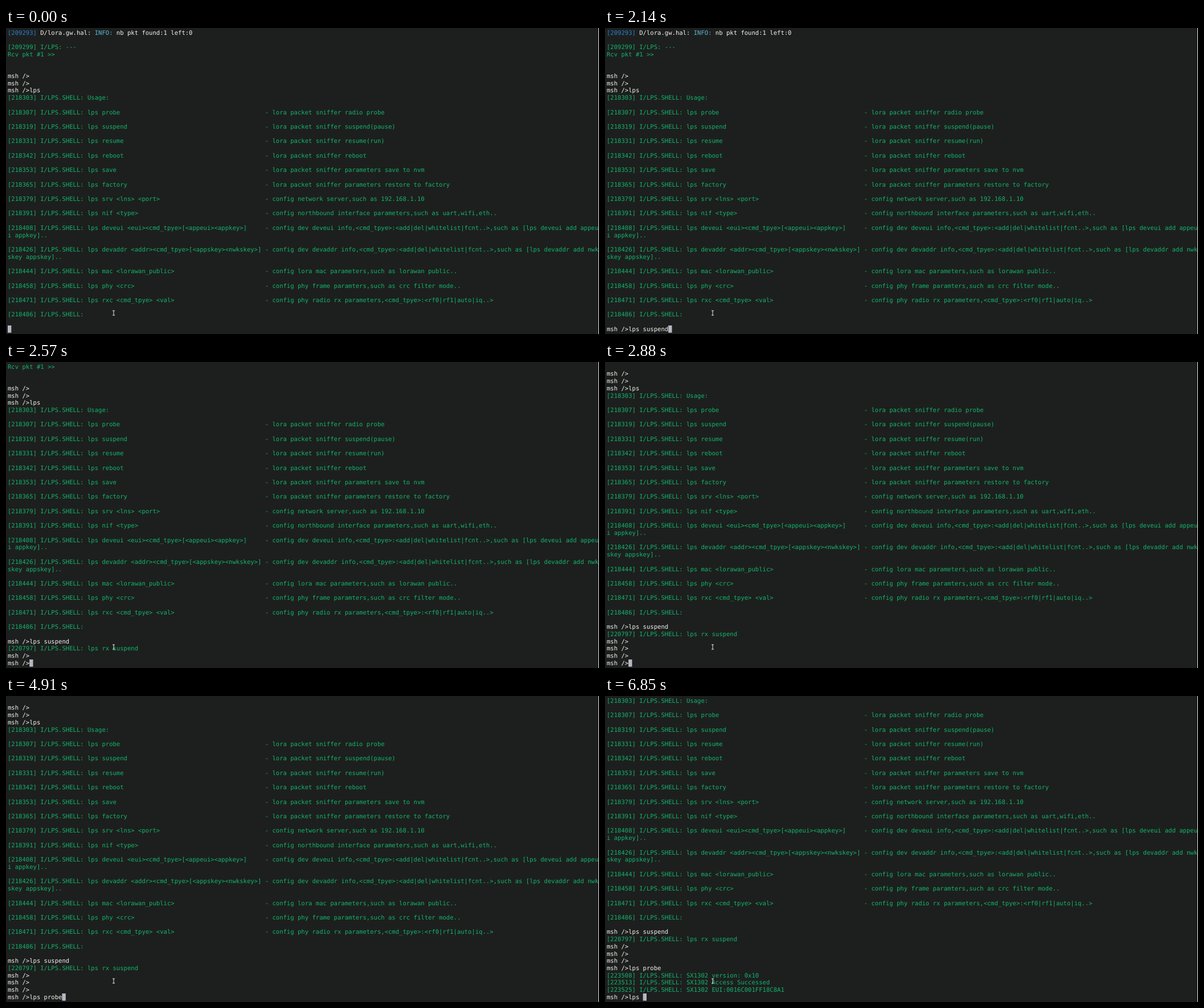
These frames come from a looping animation (1041x538 px, 8000 ms). An HTML page with a canvas:

```html
<!DOCTYPE html>
<html>
<head>
<meta charset="utf-8">
<title>Packet sniffer shell</title>
<style>
html, body { margin: 0; width: 100%; height: 100%; overflow: hidden; background: #1d1f1e; }
canvas { display: block; }
</style>
</head>
<body>
<canvas id="screen" width="1041" height="538"></canvas>
<script>
const ctx = document.getElementById('screen').getContext('2d');
const LOOP = 8000, ROWS = 42, COLS = 163;
const CELL_W = 6.362, CELL_H = 12.71, LEFT = 3, TOP = 1.9;
const BACK = '#1d1f1e', GREEN = '#12b56e', WHITE = '#f4f4f0', BLUE = '#2a83cc', CYAN = '#58bcd8';
const PROMPT = 'msh />';

// A line is a list of [colour, text] runs.
const green = text => [[GREEN, text]];
const white = text => [[WHITE, text]];
const shell = (stamp, text) => green(`[${stamp}] I/LPS.SHELL: ${text}`);

const usage = [
  [218307, 'probe', 'lora packet sniffer radio probe'],
  [218319, 'suspend', 'lora packet sniffer suspend(pause)'],
  [218331, 'resume', 'lora packet sniffer resume(run)'],
  [218342, 'reboot', 'lora packet sniffer reboot'],
  [218353, 'save', 'lora packet sniffer parameters save to nvm'],
  [218365, 'factory', 'lora packet sniffer parameters restore to factory'],
  [218379, 'srv <lns> <port>', 'config network server,such as 192.168.1.10'],
  [218391, 'nif <type>', 'config northbound interface parameters,such as uart,wifi,eth..'],
  [218408, 'deveui <eui><cmd_tpye>[<appeui><appkey>]',
    'config dev deveui info,<cmd_tpye>:<add|del|whitelist|fcnt..>,such as [lps deveui add appeui appkey]..'],
  [218426, 'devaddr <addr><cmd_tpye>[<appskey><nwkskey>]',
    'config dev devaddr info,<cmd_tpye>:<add|del|whitelist|fcnt..>,such as [lps devaddr add nwkskey appskey]..'],
  [218444, 'mac <lorawan_public>', 'config lora mac parameters,such as lorawan public..'],
  [218458, 'phy <crc>', 'config phy frame paramters,such as crc filter mode..'],
  [218471, 'rxc <cmd_tpye> <val>', 'config phy radio rx parameters,<cmd_tpye>:<rf0|rf1|auto|iq..>'],
];

const helpLines = usage.flatMap(([stamp, command, about]) => {
  const text = shell(stamp, ('lps ' + command).padEnd(49) + '- ' + about)[0][1];
  const wrapped = [green(text.slice(0, COLS))];
  if (text.length > COLS) wrapped.push(green(text.slice(COLS)));
  return [...wrapped, []];
});

const history = [
  [[BLUE, '[209293]'], [WHITE, ' D/lora.gw.hal: '], [CYAN, 'INFO:'], [WHITE, ' nb pkt found:1 left:0']],
  [], green('[209299] I/LPS: ---'), green('Rcv pkt #1 >>'), [], [],
  white(PROMPT), white(PROMPT), white(PROMPT + 'lps'),
  shell(218303, 'Usage:'), [],
  ...helpLines,
  shell(218486, ''), [],
];

// Each step: time, then the current input line, and lines printed above it.
const steps = [{ at: 0, input: '', lines: history }];
const print = (at, ...added) =>
  steps.push({ at, input: PROMPT, lines: [...steps.at(-1).lines, ...added] });
const type = (command, keys) => keys.forEach(([at, count]) =>
  steps.push({ at, input: PROMPT + command.slice(0, count), lines: steps.at(-1).lines }));

print(150);
type('lps suspend', [[710, 1], [860, 3], [1140, 4], [1260, 5], [1410, 6], [1560, 7], [1840, 9], [2140, 11]]);
print(2420, white(PROMPT + 'lps suspend'), shell(220797, 'lps rx suspend'));
print(2570, white(PROMPT));
print(2880, white(PROMPT), white(PROMPT));
type('lps probe', [[3460, 1], [3620, 2], [3770, 3], [3920, 4], [4200, 5], [4330, 6], [4480, 7], [4630, 8], [4910, 9]]);
print(5030, white(PROMPT + 'lps probe'),
  shell(223508, 'SX1302 version: 0x10'),
  shell(223513, 'SX1302 Access Successed'),
  shell(223525, 'SX1302 EUI:0016C001FF18C8A1'));
type('lps ', [[6150, 1], [6300, 2], [6430, 3], [6850, 4]]);

function drawLine(runs, row) {
  let col = 0;
  for (const [colour, text] of runs) {
    ctx.fillStyle = colour;
    for (const char of text) {
      if (char !== ' ') ctx.fillText(char, LEFT + col * CELL_W, TOP + row * CELL_H + 9.8);
      col++;
    }
  }
}

function drawPointer() {
  ctx.fillStyle = '#e8e8e8';
  ctx.fillRect(188.5, 497, 1, 8);
  ctx.fillRect(187, 496.5, 4, 1);
  ctx.fillRect(187, 504.5, 4, 1);
}

function draw({ input, lines }) {
  ctx.fillStyle = BACK;
  ctx.fillRect(0, 0, 1041, 538);
  ctx.font = '10.56px "DejaVu Sans Mono", monospace';
  ctx.textRendering = 'geometricPrecision';
  [...lines, white(input)].slice(-ROWS).forEach(drawLine);
  ctx.fillStyle = '#b9b7c3';
  ctx.fillRect(LEFT + input.length * CELL_W, TOP + (ROWS - 1) * CELL_H, CELL_W, CELL_H);
  drawPointer();
  ctx.fillStyle = '#e6e6e6';
  ctx.fillRect(1040, 0, 1, 538);
}

let shown;
function tick() {
  const time = performance.now() % LOOP;
  const step = steps.findLast(s => s.at <= time);
  if (step !== shown) draw(shown = step);
  requestAnimationFrame(tick);
}
tick();
</script>
</body>
</html>
```
